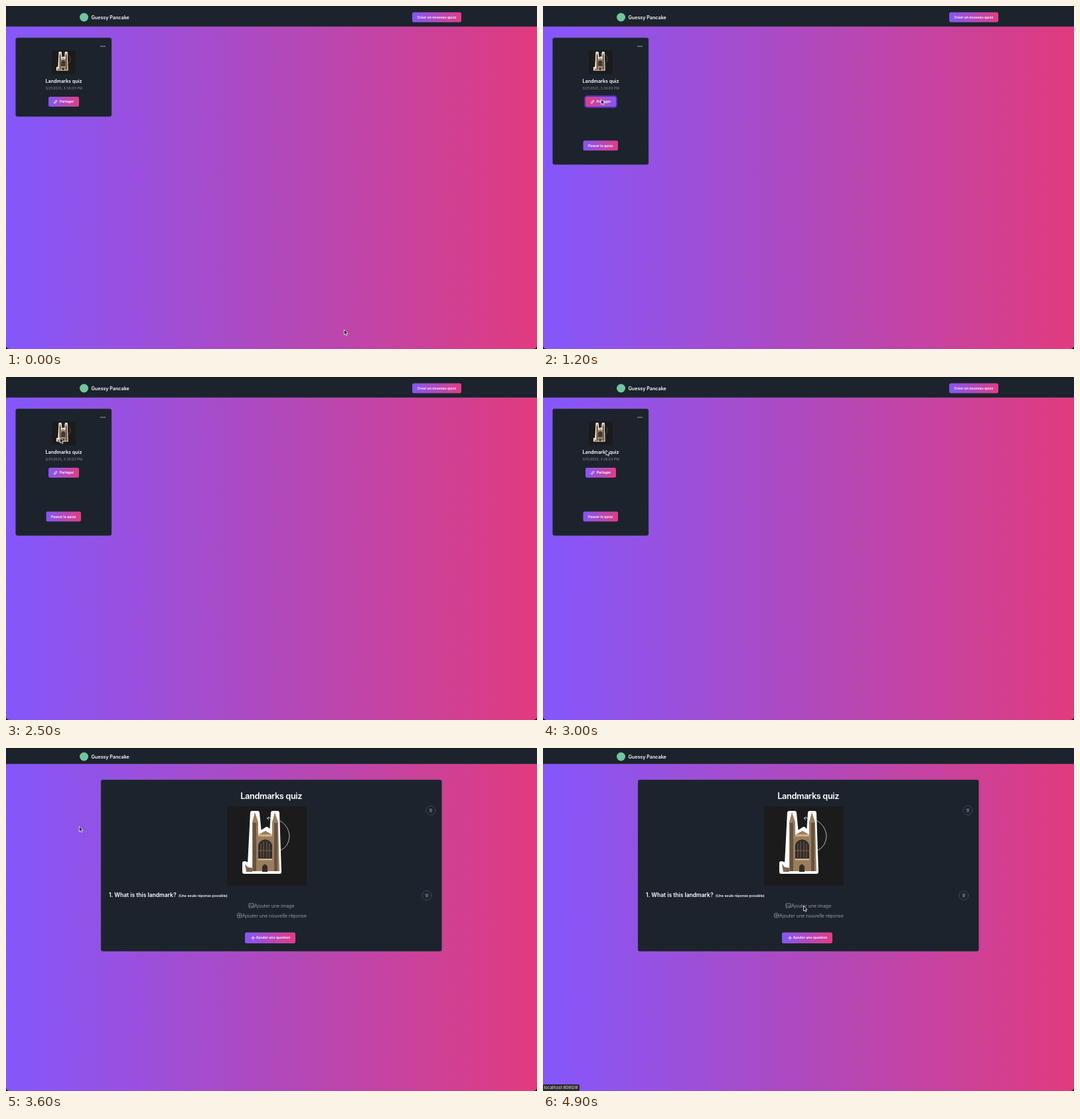
Recreate the animation shown at these times as an HTML page. Size 800x518 px, loop 5 s.

```html
<!DOCTYPE html>
<html lang="fr">
<head>
<meta charset="utf-8">
<style>
  html, body { margin: 0; width: 100%; height: 100%; overflow: hidden; background: #000; }
  svg { display: block; width: 800px; height: 518px; font-family: Inter, Roboto, sans-serif; }
  text { fill: #fff; font-weight: 600; }
  .mid { text-anchor: middle; }
  .small { font-size: 5.15px; }
  .brand, .name { font-size: 7.15px; }
  .link { font-size: 7px; font-weight: 400; fill: #989da5; }
  .panel { fill: #1c232d; stroke: #454754; stroke-width: .8; stroke-dasharray: 1.6 1.2; }
  .line { fill: none; stroke: #fff; stroke-width: .8; stroke-linecap: round; stroke-linejoin: round; }
  .grey { stroke: #989da5; }
  .dim { stroke: #48505c; }
</style>
</head>
<body>
<svg viewBox="0 0 800 518">
  <defs>
    <linearGradient id="page"><stop stop-color="#8457fc"/><stop offset=".5" stop-color="#b049bd"/><stop offset="1" stop-color="#e13b7e"/></linearGradient>
    <linearGradient id="warm"><stop stop-color="#8556f4"/><stop offset="1" stop-color="#e03d84"/></linearGradient>
    <linearGradient id="swap"><stop stop-color="#e03d84"/><stop offset="1" stop-color="#8556f4"/></linearGradient>
    <symbol id="photo" viewBox="0 0 120 120">
      <rect width="120" height="120" fill="#1c1b1c"/>
      <path d="M60 18C80 16 94 30 94 46Q93 61 80 67M64 16l-4 2 3 3" fill="none" stroke="#ddd" stroke-width=".8"/>
      <path id="outline" d="M38 10H46L49 41 60 34 67 41 69 10H76L79 99H26V86L34 88Z" fill="#fff" stroke="#fff" stroke-width="6" stroke-linejoin="round"/>
      <path d="M42 9L47 24V43L58 37 68 43V24L72 9 77 24 79 98H38V24Z" fill="#9a7d5e"/>
      <path d="M39 25h5v73h-5zM71 25h5v73h-5z" fill="#665241"/>
      <path d="M47 44H68M47 80H68" stroke="#d1b48b" stroke-width="3"/>
      <path d="M47 79V59Q48 52 57.500 50 67 52 68 59V79Z" fill="#302b28"/>
      <path d="M51 78V56M55 78V53M60 78V53M64 78V56M47 67H68" stroke="#8b735a" stroke-width=".8"/>
      <path d="M53 99V91Q57 84 61 91V99Z" fill="#352b25"/>
      <path d="M27 87L31 92 38 93V99H29Z" fill="#80674f"/>
    </symbol>
    <g id="bin">
      <circle class="line dim" r="7"/>
      <path class="line" style="stroke:#7a818b;stroke-width:.6" d="M-2.200-1.600H2.200M-.8-1.600V-2.500H.8V-1.600M-1.700-1.600L-1.400 2.500H1.400L1.700-1.600M-.5-.5V1.500M.5-.5V1.500"/>
    </g>
  </defs>

  <rect y="-10" width="800" height="528" rx="5" fill="url(#page)"/>
  <rect id="header" x="-2" y="-2" width="804" class="panel"/>
  <rect width="800" height="1.500" fill="#1b1b1e"/>
  <g id="brand">
    <circle cx="117.500" r="6.500" fill="#70c79c"/>
    <text class="brand" x="128.500" y="2.600">Guessy Pancake</text>
  </g>

  <g id="list">
    <rect x="612" y="9.500" width="74" height="15" rx="2.500" fill="url(#warm)"/>
    <text class="small mid" x="649" y="18.900">Créer un nouveau quizz</text>
    <rect id="card" class="panel" x="14.500" y="48" width="144.500" rx="3"/>
    <g fill="#b3b7bd"><circle cx="143.300" cy="60.800" r=".9"/><circle cx="146" cy="60.800" r=".9"/><circle cx="148.700" cy="60.800" r=".9"/></g>
    <use href="#photo" x="69" y="67" width="36" height="36"/>
    <text class="name mid" x="87" y="116.300">Landmarks quiz</text>
    <text class="mid" x="87" y="126.200" style="font-size:5.150px;font-weight:400;fill:#8c929b">3/21/2025, 3:36:03 PM</text>
    <rect id="ring" x="63" y="136" width="48" height="17" rx="3.500" fill="#1c232d" stroke="#4d35b8" stroke-width="1.800"/>
    <rect x="64" y="137" width="46" height="15" rx="2.500" fill="url(#warm)"/>
    <rect id="hover" x="64" y="137" width="46" height="15" rx="2.500" fill="url(#swap)"/>
    <path class="line" d="M74 145.800L75.500 144.300M74.400 143.300L75.200 142.500Q76.200 141.900 76.800 142.900 77 143.800 76.200 144.500L75.400 145.200M74.700 146.200L74 146.900Q73 147.500 72.300 146.500 72 145.600 72.800 144.900L73.600 144.200"/>
    <text class="small" x="80.800" y="146.400">Partager</text>
    <g id="share">
      <rect x="60.500" y="203.300" width="52.500" height="15" rx="2.500" fill="url(#warm)"/>
      <text class="small mid" x="86.800" y="212.700">Passer le quizz</text>
    </g>
  </g>

  <g id="editor">
    <rect class="panel" x="143" y="48" width="513.500" height="259" rx="3"/>
    <text class="mid" x="399.700" y="77" style="font-size:12.800px;letter-spacing:-.4px">Landmarks quiz</text>
    <use href="#photo" x="333" y="88" width="120" height="120"/>
    <use href="#bin" x="640" y="94.200"/>
    <use href="#bin" x="634" y="222.700"/>
    <text x="155" y="224.600" style="font-size:8.500px">1. What is this landmark?</text>
    <text x="260" y="224.600" style="font-size:5.250px">(Une seule réponse possible)</text>
    <path class="line grey" d="M366.500 235H373V241H366.500ZM366.500 239L368.500 237.500 370.500 239.500 373 238"/>
    <text class="link" x="374" y="241.400">Ajouter une image</text>
    <circle class="line grey" cx="351.700" cy="253" r="3.600"/>
    <path class="line grey" d="M350 253H353.400M351.700 251.300V254.700"/>
    <text class="link" x="356" y="256.400">Ajouter une nouvelle réponse</text>
    <rect x="360" y="278.500" width="76" height="16.500" rx="2.500" fill="url(#warm)"/>
    <path class="line" d="M369.600 286.800H374.800M372.200 284.200V289.400"/>
    <text class="small" x="376.700" y="288.300">Ajouter une question</text>
  </g>

  <g id="status">
    <path d="M0 508H53Q55 508 55 510V518H0Z" fill="#2c2b30"/>
    <text x="1.500" y="515.300" style="font-size:6.350px;font-weight:400;fill:#e4e4e6">localhost:8080/#</text>
  </g>
  <path id="cursor" d="M0 0V7.600L1.800 6 3.100 8.800 4.400 8.200 3.200 5.500H5.600Z" fill="#000" stroke="#fff" stroke-width=".8"/>
</svg>
<script>
  const el = id => document.getElementById(id);
  const show = (id, on) => el(id).style.display = on ? '' : 'none';
  const ramp = (t, from, to) => Math.min(1, Math.max(0, (t - from) / (to - from)));
  const ease = p => p * p * (3 - 2 * p);

  // Pointer path: time, x, y
  const path = [
    [0, 509.500, 489], [600, 90, 143], [1200, 87.500, 141], [1500, 75, 88],
    [1700, 75, 88], [2000, 72.500, 78.500], [2300, 74, 82], [2800, 95, 110.500],
    [3500, 95, 111], [4200, 372, 248.500], [4600, 392.500, 238.500], [5000, 392.500, 238.500]
  ];

  function pointer(t) {
    const i = path.findIndex(key => key[0] > t);
    const [a, b] = [path[i - 1], path[i]];
    const p = ease(ramp(t, a[0], b[0]));
    return [1, 2].map(k => a[k] + (b[k] - a[k]) * p);
  }

  function draw(t) {
    const editing = t >= 3100, open = t >= 900;
    const height = editing ? 24 : 31;
    el('header').setAttribute('height', height + 2);
    el('brand').setAttribute('transform', `translate(0 ${editing ? 13 : 17})`);
    el('card').setAttribute('height', open ? 191.5 : 119);
    show('list', !editing);
    show('editor', editing);
    show('share', open);
    show('ring', t >= 800 && t < 2400);
    el('hover').style.opacity = ramp(t, 500, 700) - ramp(t, 1300, 1500);
    el('status').style.opacity = ramp(t, 4000, 4300);
    el('cursor').setAttribute('transform', `translate(${pointer(t)})`);
  }

  const STEP = 100, LOOP = 5000;
  function tick() {
    draw(Math.floor(performance.now() % LOOP / STEP) * STEP);
    requestAnimationFrame(tick);
  }
  tick();
</script>
</body>
</html>
```
